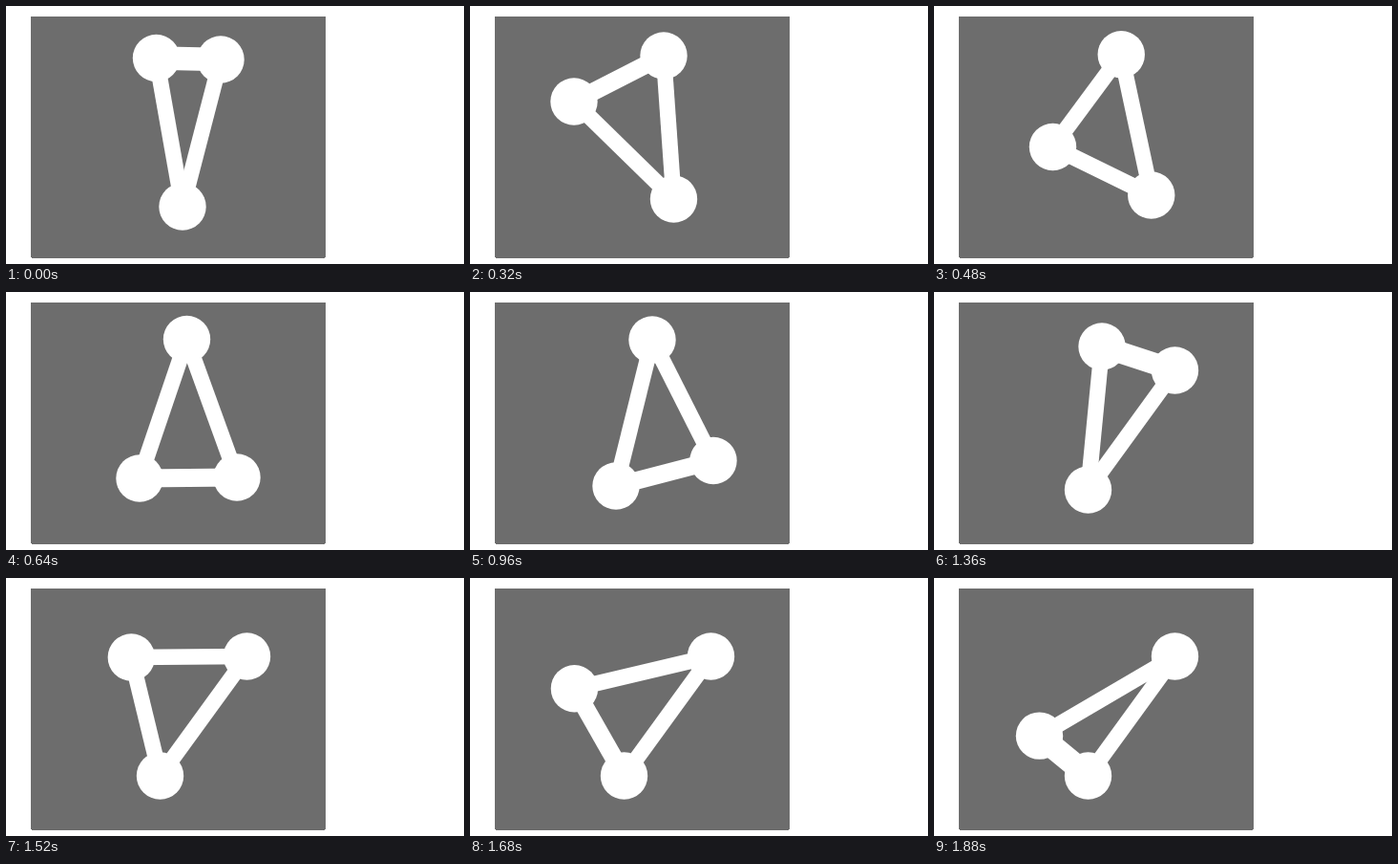
An HTML page that plays this animation: 480x270 px, repeating every 1920 ms.

```html
<!DOCTYPE html>
<html lang="en">
<head>
<meta charset="utf-8">
<title>Linked nodes</title>
<style>
  html, body { margin: 0; width: 100%; height: 100%; overflow: hidden; background: #fff; }
  svg { display: block; width: 480px; height: 270px; }
  .panel { fill: #6d6d6d; }
  .node { fill: #fff; }
  .link { stroke: #fff; }
</style>
</head>
<body>
<svg viewBox="0 0 480 270">
  <path class="panel" d="M26 11h309v252h-1v1h-307v-1h-1z"/>
  <line class="link"/><line class="link"/><line class="link"/>
  <circle class="node" r="24.7"/><circle class="node" r="24.7"/><circle class="node" r="24.7"/>
</svg>
<script>
const LOOP = 1920, STEP = 40;

// Nodes move in straight lines between stops, all on the same beats, and rest at their last stop.
const beats = [0, 320, 640, 960, 1320, 1600, LOOP];
const paths = [
  [[157.5, 54.5], [109, 100], [140, 195], [153, 203], [161.5, 207]],
  [[225, 56], [203, 52], [189.5, 49.5], [191, 50], [187.2, 50.5], [109, 96], [110.7, 175]],
  [[185, 210], [213.5, 202], [242, 194], [255, 176.5], [252.5, 82]]
];

const links = document.querySelectorAll(".link");
const nodes = document.querySelectorAll(".node");

const mix = (a, b, k) => a + (b - a) * k;

// Links thicken as they get shorter.
const linkWidth = length => 16.5 + 0.15 * Math.max(0, 120 - length);

function setAll(el, attrs) {
  for (const name in attrs) el.setAttribute(name, attrs[name]);
}

function draw(t) {
  const next = beats.findIndex(beat => beat > t);
  const k = (t - beats[next - 1]) / (beats[next] - beats[next - 1]);
  const points = paths.map(path => {
    const last = path[path.length - 1];
    const from = path[next - 1] || last, to = path[next] || last;
    return [mix(from[0], to[0], k), mix(from[1], to[1], k)];
  });

  points.forEach(([x, y], i) => {
    const [x2, y2] = points[(i + 1) % points.length];
    setAll(nodes[i], { cx: x, cy: y });
    setAll(links[i], {
      x1: x, y1: y, x2, y2,
      "stroke-width": linkWidth(Math.hypot(x2 - x, y2 - y))
    });
  });
}

const began = performance.now();
function tick() {
  const t = (performance.now() - began) % LOOP;
  draw(Math.floor(t / STEP) * STEP);
  requestAnimationFrame(tick);
}
draw(0);
requestAnimationFrame(tick);
</script>
</body>
</html>
```
